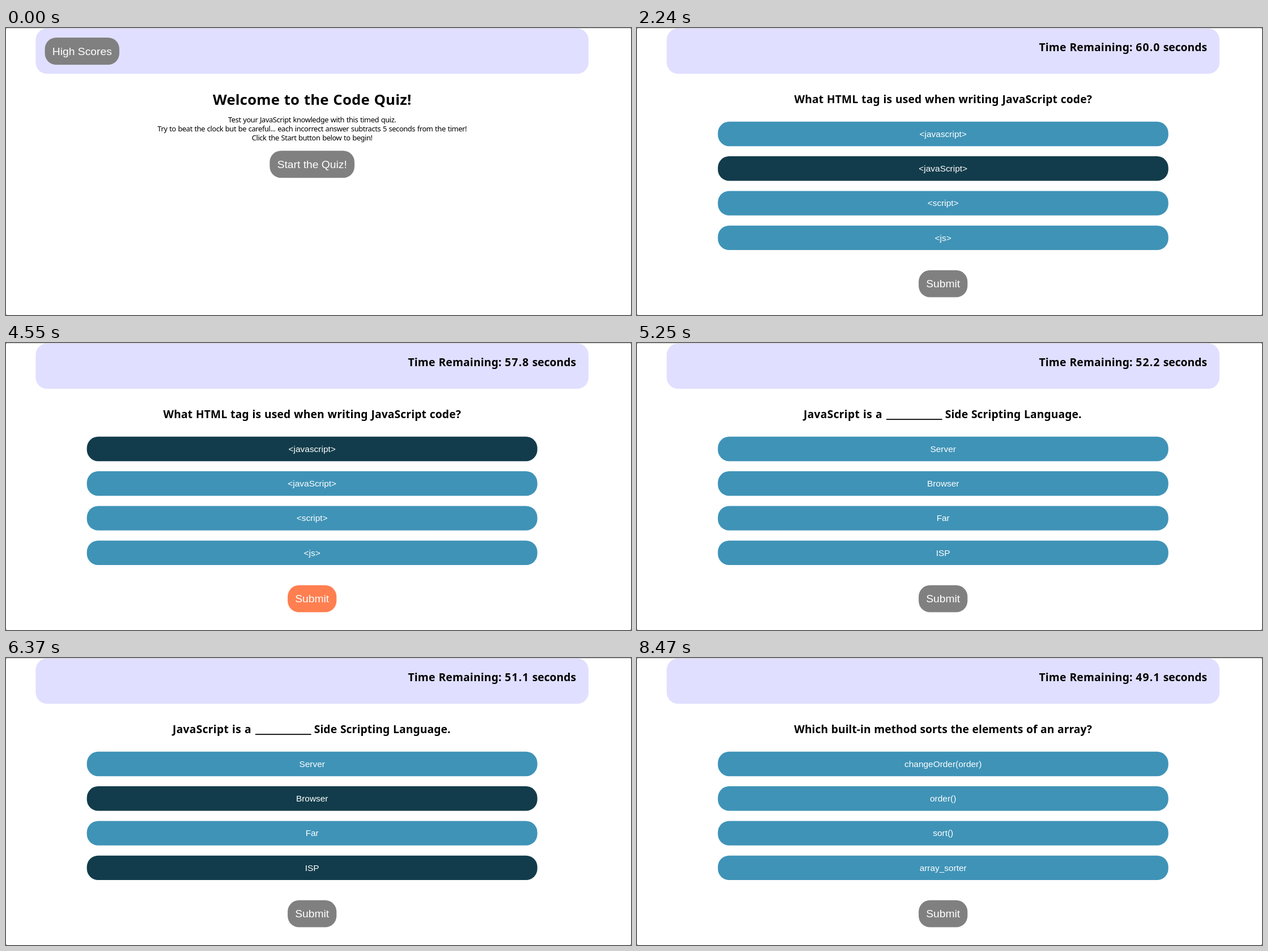
Recreate the animation shown at these times as an HTML page. Size 1103 by 508 pixels, loop 8540 ms.

```html
<!DOCTYPE html>
<html lang="en">
<head>
<meta charset="utf-8">
<title>Code Quiz</title>
<style>
  html, body { margin: 0; width: 100%; height: 100%; overflow: hidden; background: #fff; }
  svg { display: block; width: 1103px; height: 508px; }
  text { white-space: pre; }
  .body { font: 12.86px "Noto Sans", sans-serif; letter-spacing: -.0305em; word-spacing: .053em; }
  .bold { font: bold 19.28px "Noto Sans", sans-serif; word-spacing: .033em; }
  .title { font-size: 25.7px; }
  .button { font: 19.28px "Liberation Sans", Arial, sans-serif; fill: #fff; }
  .option { font: 15.43px "Liberation Sans", Arial, sans-serif; fill: #fff; }
</style>
</head>
<body>
<svg id="stage" viewBox="0 0 1103 508" xmlns="http://www.w3.org/2000/svg"></svg>
<script>
const LOOP = 8540, STEP = 70, CENTER = 540.2;
const QUIZ_START = 2240, TICK = 105, FIRST_SUBMIT = 4830, SECOND_SUBMIT = 6930;
const GRAY = [128, 128, 128], CORAL = [255, 127, 80];
const LIGHT = '#3f93b7', DARK = '#123c4b';

function add(parent, tag, attrs = {}, content = '') {
  const node = document.createElementNS('http://www.w3.org/2000/svg', tag);
  for (const key in attrs) node.setAttribute(key, attrs[key]);
  node.textContent = content;
  parent.appendChild(node);
  return node;
}

function label(parent, cls, x, y, content, anchor = 'middle', spacing) {
  const node = add(parent, 'text', { class: cls, x, y, 'text-anchor': anchor }, content);
  if (spacing !== undefined) node.style.letterSpacing = spacing + 'em';
  return node;
}

function pill(parent, cls, y, width, height, content, fill, x = CENTER - width / 2) {
  const rect = add(parent, 'rect', { x, y, width, height, rx: 20, fill });
  const baseline = y + height / 2 + (cls === 'button' ? 6.68 : 5.35);
  const text = label(parent, cls, x + width / 2, baseline, content);
  return { rect, text };
}

const show = (node, visible) => node.setAttribute('display', visible ? 'inline' : 'none');

const stage = document.getElementById('stage');
add(stage, 'rect', { width: 1103, height: 508, fill: '#fff' });
add(stage, 'rect', { width: 1103, height: 1, fill: '#cfcfcf' });
for (const x of [0, 1102]) for (const y of [0, 507])
  add(stage, 'rect', { x, y, width: 1, height: 1, fill: '#444' });
add(stage, 'rect', { x: 52.4, y: 0.8, width: 975.6, height: 80.3, rx: 20, fill: '#e0dfff' });

// Welcome page
const welcome = add(stage, 'g');
pill(welcome, 'button', 17, 131.4, 48.1, 'High Scores', '#808080', 68.6);
label(welcome, 'bold title', CENTER, 136, 'Welcome to the Code Quiz!', 'middle', .007);
[
  'Test your JavaScript knowledge with this timed quiz.',
  'Try to beat the clock but be careful... each incorrect answer subtracts 5 seconds from the timer!',
  'Click the Start button below to begin!'
].forEach((line, i) => label(welcome, 'body', CENTER, 167 + 16 * i, line));
const start = pill(welcome, 'button', 217.2, 149.6, 48.1, 'Start the Quiz!', '#808080');

// Quiz page
const quiz = add(stage, 'g');
label(quiz, 'bold', 709.4, 41, 'Time Remaining:', 'start', .0105);
const clock = label(quiz, 'bold', 880.2, 41, '60.0', 'start', .063);
label(quiz, 'bold', 928.7, 41, 'seconds', 'start', .001);

const headings = [0, 1, 2].map(() => add(quiz, 'g'));
label(headings[0], 'bold', CENTER, 133, 'What HTML tag is used when writing JavaScript code?', 'middle', .0065);
label(headings[1], 'bold', 294, 133, 'JavaScript is a', 'start', .0145);
add(headings[1], 'rect', { x: 440, y: 134.3, width: 98.6, height: 1.8 });
label(headings[1], 'bold', 543.7, 133, 'Side Scripting Language.', 'start', .005);
label(headings[2], 'bold', CENTER, 133, 'Which built-in method sorts the elements of an array?', 'middle', .001);

const answers = [
  ['<javascript>', '<javaScript>', '<script>', '<js>'],
  ['Server', 'Browser', 'Far', 'ISP'],
  ['changeOrder(order)', 'order()', 'sort()', 'array_sorter']
];
const options = [0, 1, 2, 3].map(i => pill(quiz, 'option', 165.8 + 61.3 * i, 795, 43.4, '', LIGHT));
const submit = pill(quiz, 'button', 428.8, 86.2, 47.8, 'Submit', '#808080');

// Dark options: [index, from, to], by hover or selection
const highlights = [
  [1, QUIZ_START, 2800], [0, 2800, FIRST_SUBMIT],
  [1, 4060, 4130], [2, 4130, 4200], [3, 4200, 4270],
  [3, 5320, 5390], [2, 5390, 5460], [1, 5460, SECOND_SUBMIT],
  [2, 6160, 6300], [3, 6300, 6440]
];

// Three-step fade, complete 140 ms after it begins
const fade = (t, from) => Math.max(0, Math.min(1, (t - from + STEP) / (3 * STEP)));
const hoverColor = amount =>
  `rgb(${GRAY.map((c, i) => Math.round(c + (CORAL[i] - c) * amount))})`;

function render(time) {
  const t = Math.floor((time % LOOP) / STEP) * STEP;
  const playing = t >= QUIZ_START;
  show(welcome, !playing);
  show(quiz, playing);
  start.rect.setAttribute('fill', hoverColor(fade(t, 1470)));
  if (!playing) return;

  const question = (t >= FIRST_SUBMIT) + (t >= SECOND_SUBMIT);
  const tenths = 600 - Math.floor((t - QUIZ_START) / TICK) - (question ? 50 : 0);
  clock.textContent = (tenths / 10).toFixed(1);
  headings.forEach((node, i) => show(node, i === question));
  options.forEach(({ rect, text }, i) => {
    const dark = highlights.some(([index, from, to]) => index === i && t >= from && t < to);
    rect.setAttribute('fill', dark ? DARK : LIGHT);
    text.textContent = answers[question][i];
  });
  const hover = fade(t, 4200) - fade(t, 5110) + fade(t, 6440) - fade(t, 7070);
  submit.rect.setAttribute('fill', hoverColor(hover));
}

const origin = performance.now();
function frame() {
  render(performance.now() - origin);
  requestAnimationFrame(frame);
}
frame();
</script>
</body>
</html>
```
